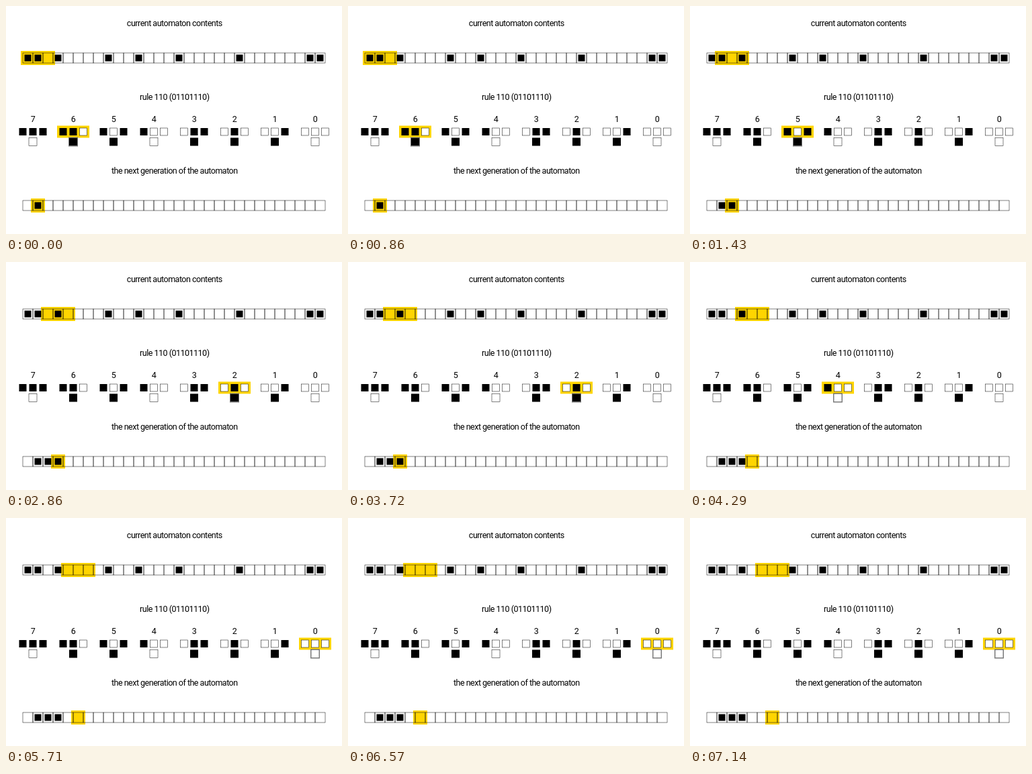
Write an HTML page that moves like this. It is 500x340 px and loops after 8 s.

```html
<!DOCTYPE html>
<html lang="en">
<head>
<meta charset="utf-8">
<title>Rule 110</title>
<style>
  html, body { margin: 0; width: 100%; height: 100%; overflow: hidden; background: #fff; }
  svg { display: block; width: 500px; height: 340px; }
  text { font: 12.5px Roboto, sans-serif; letter-spacing: -.5px; text-anchor: middle; }
  .mark { fill: #ffd500; }
  .cell, .off { stroke: #000; stroke-width: .5; }
  .cell { fill: none; }
  .off { fill: #fff; }
  .chosen { fill: none; stroke: #777; }
</style>
</head>
<body>
<svg viewBox="0 0 500 340"></svg>
<script>
const LOOP = 8000;
const STARTS = [0, 1430, 2860, 4290, 5710, 7140];
const RULE = 110;
const COUNT = 30, CELL = 15, LEFT = 25;
const TOP_ROW = 70, NEXT_ROW = 290;
const PATTERN_Y = 187.5, OUTPUT_Y = 202.5;
const live = new Set([0, 1, 3, 8, 11, 15, 21, 28, 29]);
const svg = document.querySelector('svg');

const bit = (value, place) => value >> place & 1;
const cell = i => live.has(i) ? 1 : 0;
const patternAt = i => cell(i - 1) * 4 + cell(i) * 2 + cell(i + 1);
const caseX = pattern => 40 + (7 - pattern) * 60;

function add(tag, attrs, text = '') {
  const node = document.createElementNS('http://www.w3.org/2000/svg', tag);
  for (const name in attrs) node.setAttribute(name, attrs[name]);
  node.textContent = text;
  return svg.appendChild(node);
}

const rect = (x, y, width, height, attrs) => add('rect', { x, y, width, height, ...attrs });
const square = (cx, cy, size, attrs) => rect(cx - size / 2, cy - size / 2, size, size, attrs);
const label = (x, y, text) => add('text', { x, y }, text);

// Highlights lie beneath everything else.
const windowMark = rect(0, TOP_ROW - 3, 3 * CELL + 6, CELL + 6, { class: 'mark' });
const nextMark = rect(0, NEXT_ROW - 3, CELL + 6, CELL + 6, { class: 'mark' });
const caseMark = rect(0, PATTERN_Y - 9, 48, 18, { class: 'mark' });

function drawRow(y, isOn) {
  const dots = [];
  for (let i = 0; i < COUNT; i++) {
    const cx = LEFT + (i + .5) * CELL, cy = y + CELL / 2;
    square(cx, cy, CELL, { class: 'cell' });
    if (isOn(i)) dots.push({ i, node: square(cx, cy, 10) });
  }
  return dots;
}

drawRow(TOP_ROW, cell);
const nextDots = drawRow(NEXT_ROW, i => i > 0 && bit(RULE, patternAt(i)));

function drawCase(pattern) {
  const x = caseX(pattern);
  const box = (cx, cy, size, on) => square(cx, cy, size, on ? {} : { class: 'off' });
  label(x, 173, pattern);
  for (let k = 0; k < 3; k++) box(x + (k - 1) * CELL, PATTERN_Y, 11, bit(pattern, 2 - k));
  box(x, OUTPUT_Y, 12, bit(RULE, pattern));
}
for (let pattern = 7; pattern >= 0; pattern--) drawCase(pattern);

const chosen = square(0, OUTPUT_Y, 13, { class: 'chosen' });

label(250.8, 30, 'current automaton contents');
label(250.8, 140, `rule ${RULE} (${RULE.toString(2).padStart(8, '0')})`);
label(250.8, 250, 'the next generation of the automaton');

function render(time) {
  const step = STARTS.findLastIndex(start => time >= start);
  const center = step + 1;
  const x = caseX(patternAt(center));
  windowMark.setAttribute('x', LEFT + step * CELL - 3);
  nextMark.setAttribute('x', LEFT + center * CELL - 3);
  caseMark.setAttribute('x', x - 24);
  chosen.setAttribute('x', x - 6.5);
  for (const { i, node } of nextDots) {
    node.setAttribute('visibility', i <= center ? 'visible' : 'hidden');
  }
}

const origin = performance.now();
function tick() {
  render((performance.now() - origin) % LOOP);
  requestAnimationFrame(tick);
}
tick();
</script>
</body>
</html>
```
